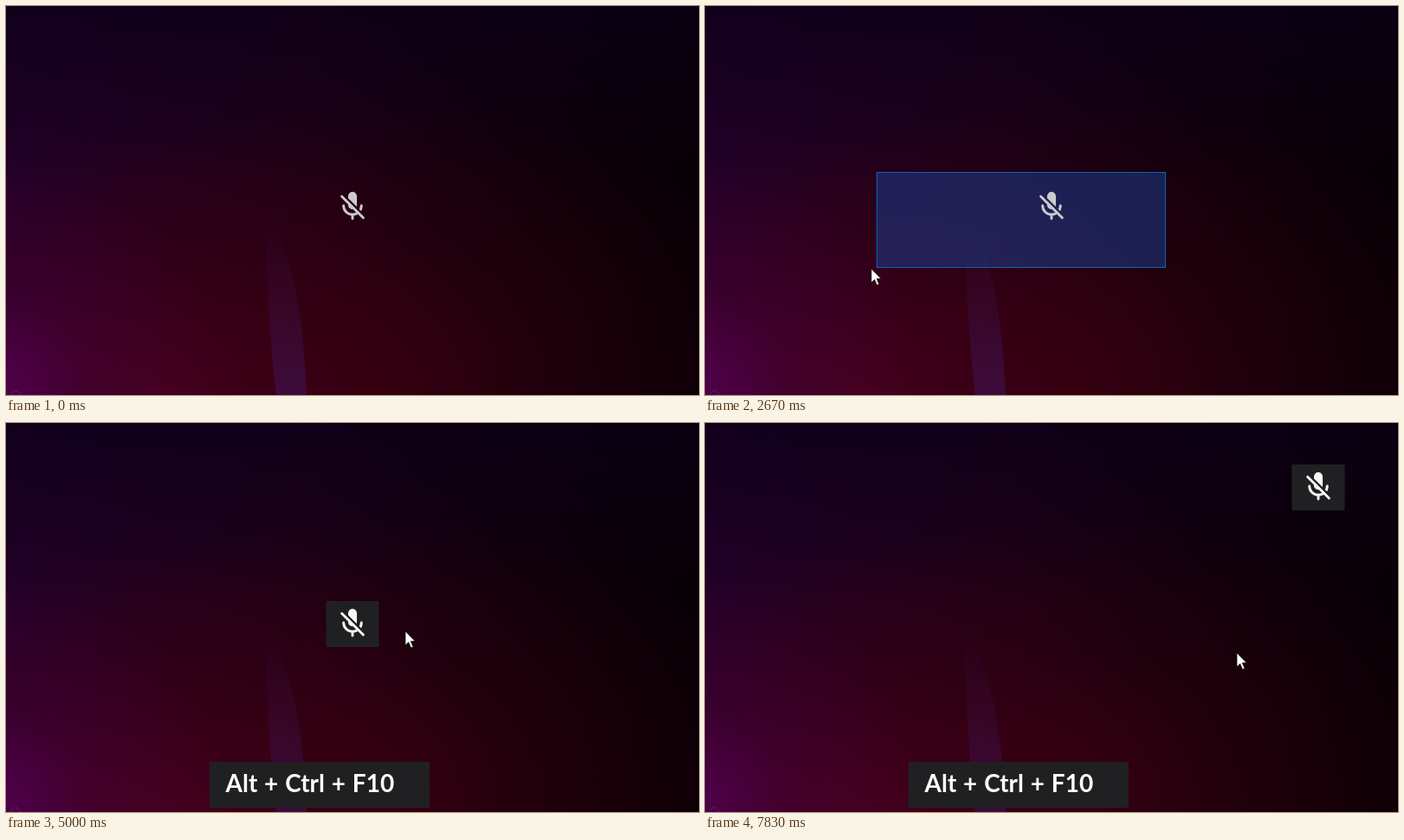
Write an HTML page that moves like this. It is 800 px wide and 450 px high and loops after 8000 ms.

```html
<!DOCTYPE html>
<html lang="en">
<head>
<meta charset="utf-8">
<title>Mute overlay</title>
<style>
  html, body { margin: 0; width: 100%; height: 100%; overflow: hidden; background: #080006; }
  #stage {
    position: relative; width: 800px; height: 450px; overflow: hidden;
    background:
      linear-gradient(rgba(10, 0, 24, .7), rgba(10, 0, 18, 0) 45%),
      radial-gradient(circle 270px at -10px 440px, rgba(92, 0, 94, .72), rgba(80, 0, 76, .32) 40%, rgba(60, 0, 50, 0)),
      radial-gradient(ellipse 400px 310px at 180px 450px, rgba(74, 0, 26, .8), rgba(64, 0, 22, .42) 50%, rgba(50, 0, 18, 0)),
      radial-gradient(ellipse 500px 340px at 420px 440px, rgba(56, 0, 14, .8), rgba(44, 0, 10, .45) 50%, rgba(30, 0, 6, 0)),
      linear-gradient(to right, #220028, #1e0016 45%, #10000a 75%, #080005);
  }
  svg { position: absolute; left: 0; top: 0; }
  text { font: 700 28px Lato, "Open Sans", sans-serif; word-spacing: 1px; fill: #fff; }
  #mic { stroke-linecap: round; }
</style>
</head>
<body>
<div id="stage">
  <svg width="800" height="450" viewBox="0 0 800 450">
    <defs>
      <linearGradient id="fade" x1="0" y1="0" x2="0" y2="1">
        <stop offset="0" stop-color="#3a1048" stop-opacity="0"/>
        <stop offset="1" stop-color="#3e1250" stop-opacity=".65"/>
      </linearGradient>
      <mask id="gap" maskUnits="userSpaceOnUse" x="-20" y="-20" width="40" height="40">
        <rect x="-20" y="-20" width="40" height="40" fill="#fff"/>
        <path d="M-16 -17.9L16 14.1" stroke="#000" stroke-width="2.6"/>
      </mask>
    </defs>
    <path fill="url(#fade)" d="M298 235Q340 290 347 450H312Q303 370 302 320Z"/>
    <circle cx="11" cy="450" r="5" fill="none" stroke="#a878a8" stroke-opacity=".6" stroke-dasharray="1 2"/>
    <rect id="sel" fill="#1a4096" fill-opacity=".5" stroke="#0864b4"/>
    <g id="keys">
      <rect x="235" y="392" width="254" height="53" fill="#202022"/>
      <text x="253.5" y="426.5">Alt + Ctrl + F10</text>
    </g>
    <g id="badge">
      <rect id="tile" x="-30.5" y="-25" width="61" height="53" fill="#202022"/>
      <g id="mic" fill="none" stroke-width="2.9">
        <g mask="url(#gap)">
          <rect x="-3.6" y="-14.6" width="7.2" height="17.5" rx="3.6" fill="currentColor" stroke="currentColor"/>
          <path d="M-10.3 0A10.3 10.3 0 0 0 10.3 0M0 10.5V15" stroke="currentColor"/>
        </g>
        <path d="M-12.4 -10.8L12.4 14" stroke="currentColor"/>
      </g>
    </g>
    <path id="cursor" fill="#fff" stroke="#111" stroke-width=".7" d="M0 0V16L3.7 12.6 6.5 19 9 18 6.3 11.6 11 11.3Z"/>
  </svg>
</div>
<script>
const LOOP = 8000, TICK = 1000 / 12;
const ENTER = 500, SHOW = 4583, FADE = 250, LAG = 10;
const HOME = [400, 231], ORIGIN = [440, 470];

// Pointer moves: start, end, x, y
const moves = [
  [417, 833, 404, 290],
  [1000, 1250, 394, 225],
  [1250, 1583, 318, 311],
  [1667, 2250, 531, 192],
  [2250, 2750, 165, 313],
  [3083, 3583, 472, 238],
  [3750, 4167, 461, 241],
  [5417, 6167, 394, 237],
  [6167, 6750, 663, 153],
  [6750, 7000, 702, 79],
  [7250, 7667, 614, 266]
];
// Selection drags and the badge drag: press, release
const drags = [[1250, 1750], [2250, 3083]];
const grab = [6167, 7000];

const [sel, keys, badge, tile, mic, cursor] =
  ["sel", "keys", "badge", "tile", "mic", "cursor"].map(id => document.getElementById(id));

const clamp = (v, lo, hi) => Math.max(lo, Math.min(hi, v));
const ease = k => k * k * (3 - 2 * k);
const place = (node, [x, y]) => node.setAttribute("transform", `translate(${x} ${y})`);

function pointer(t) {
  let [x, y] = ORIGIN;
  for (const [start, end, toX, toY] of moves) {
    const k = ease(clamp((t - start) / (end - start), 0, 1));
    x += (toX - x) * k;
    y += (toY - y) * k;
  }
  return [Math.round(x), Math.round(y)];
}

function select(t) {
  const drag = drags.find(([press, release]) => t > press + LAG && t < release);
  sel.style.display = drag ? "" : "none";
  if (!drag) return;
  const [ax, ay] = pointer(drag[0]), [x, y] = pointer(t - LAG);
  const box = {
    x: Math.min(x, ax) + .5, y: Math.min(y, ay) + .5,
    width: Math.abs(ax - x), height: Math.abs(ay - y)
  };
  for (const k in box) sel.setAttribute(k, box[k]);
}

function draw(now) {
  const t = Math.floor((now % LOOP + 5) / TICK) * TICK;
  place(cursor, pointer(t));
  cursor.style.display = t < ENTER - 5 ? "none" : "";
  select(t);

  const shown = clamp((t - SHOW) / FADE, 0, 1);
  const grey = Math.round(203 + 44 * shown);
  keys.style.opacity = tile.style.opacity = shown;
  mic.style.color = `rgb(${grey},${grey},${grey})`;

  const from = pointer(grab[0]), to = pointer(clamp(t, ...grab));
  place(badge, HOME.map((v, i) => v + to[i] - from[i]));
}

const begin = performance.now();
function loop() {
  draw(performance.now() - begin);
  requestAnimationFrame(loop);
}
loop();
</script>
</body>
</html>
```
